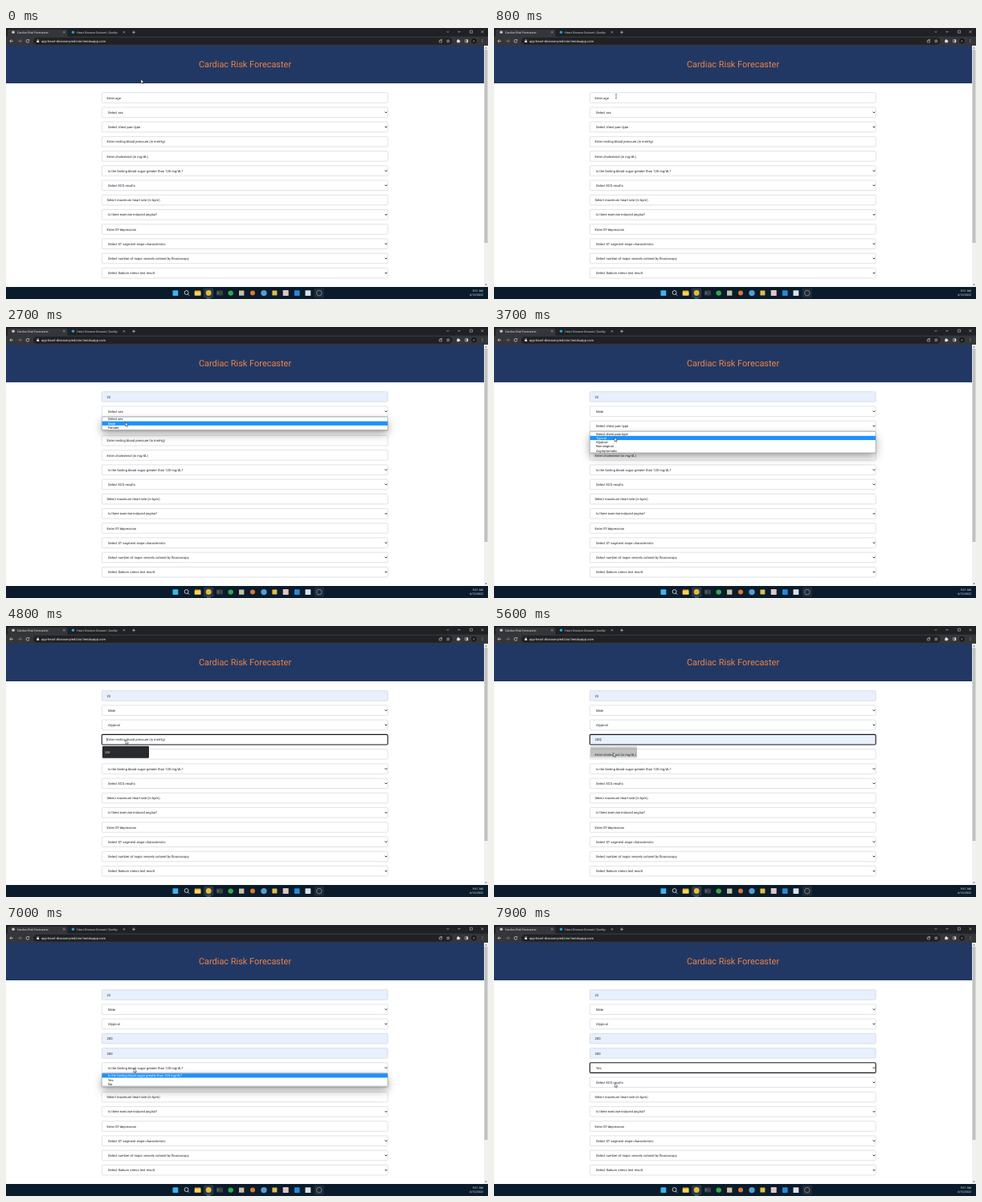
Write an HTML page with a canvas that moves like this. It is 600x338 px and loops after 8000 ms.

```html
<!DOCTYPE html>
<html lang="en">
<head>
<meta charset="utf-8">
<title>Cardiac Risk Forecaster</title>
<style>
html, body { margin: 0; width: 100%; height: 100%; overflow: hidden; background: #fff; }
canvas { display: block; width: 600px; height: 338px; }
</style>
</head>
<body>
<canvas id="stage"></canvas>
<script>
const W = 600, H = 338, LOOP = 8000, STEP = 100;
const FONT = 'Roboto, Arial, sans-serif';
const LEFT = 119, WIDTH = 356.5, ROW = 5.25;
const canvas = document.getElementById('stage');
const ctx = canvas.getContext('2d');
const dpr = window.devicePixelRatio || 1;
canvas.width = W * dpr;
canvas.height = H * dpr;
ctx.scale(dpr, dpr);

// focus: [on, off], menu: [open, close], set: time the value appears
const fields = [
  { label: 'Enter age', value: '23', set: 1400, focus: [1000, 2300], popup: [1100, 1520] },
  { label: 'Select sex', value: 'Male', set: 2900, focus: [2900, 3400], menu: [2400, 2900],
    options: ['Select sex', 'Male', 'Female'] },
  { label: 'Select chest pain type', value: 'Atypical', set: 4100, focus: [4100, 4700], menu: [3500, 4100],
    options: ['Select chest pain type', 'Typical', 'Atypical', 'Non-anginal', 'Asymptomatic'] },
  { label: 'Enter resting blood pressure (in mmHg)', value: '200', set: 5200, focus: [4700, 6000], popup: [4800, 5467] },
  { label: 'Enter cholesterol (in mg/dL)', value: '200', set: 6300, focus: [6000, 6950], popup: [6100, 6420] },
  { label: 'Is the fasting blood sugar greater than 120 mg/dL?', value: 'Yes', set: 7500, focus: [7500, LOOP], menu: [7000, 7500],
    options: ['Is the fasting blood sugar greater than 120 mg/dL?', 'Yes', 'No'] },
  { label: 'Select ECG results', select: true },
  { label: 'Select maximum heart rate (in bpm)' },
  { label: 'Is there exercise-induced angina?', select: true },
  { label: 'Enter ST-depression' },
  { label: 'Select ST segment slope characteristic', select: true },
  { label: 'Select number of major vessels colored by flouroscopy', select: true },
  { label: 'Select thalium stress test result', select: true }
];
fields.forEach((f, i) => {
  f.y = 87 + 18.22 * i;
  f.select = f.select || !!f.options;
});

// [time, x, y] of the pointer tip
const path = [
  [0, 168, 64], [100, 168, 64], [800, 152, 85], [1000, 152, 85],
  [1400, 150.5, 100.8], [1700, 150.5, 100.8], [2100, 149.5, 103.5], [2400, 149.5, 103.5],
  [2700, 148.5, 118.8], [2900, 148.5, 118.8], [3300, 150, 122.5], [3500, 150, 122.5],
  [3700, 150, 137.8], [3800, 150, 137.8], [4000, 149, 142.5], [4700, 149, 140.5],
  [5200, 148.5, 158], [6000, 148.5, 158], [6300, 150, 174.5], [6400, 150, 174.5],
  [6800, 159, 179], [7100, 159, 179], [7400, 150.3, 192], [7500, 150.3, 192],
  [7900, 150.3, 197.3]
];

function pointerAt(t) {
  const i = path.findIndex(p => p[0] > t);
  if (i < 0) return path[path.length - 1].slice(1);
  const [a, b] = [path[i - 1], path[i]];
  const u = (t - a[0]) / (b[0] - a[0]), e = u * u * (3 - 2 * u);
  return [a[1] + (b[1] - a[1]) * e, a[2] + (b[2] - a[2]) * e];
}

const within = (t, span) => !!span && t >= span[0] && t < span[1];

function text(s, x, y, size, color, align = 'left', weight = 400) {
  ctx.font = `${weight} ${size}px ${FONT}`;
  ctx.textRendering = 'geometricPrecision';
  ctx.textAlign = align;
  ctx.fillStyle = color;
  ctx.fillText(s, x, y + size * 0.355);
}

function rect(x, y, w, h, color) {
  ctx.fillStyle = color;
  ctx.fillRect(x, y, w, h);
}

function box(x, y, w, h, r, fill, stroke, lw = 0.6) {
  ctx.beginPath();
  ctx.roundRect(x, y, w, h, r);
  if (fill) { ctx.fillStyle = fill; ctx.fill(); }
  if (stroke) { ctx.strokeStyle = stroke; ctx.lineWidth = lw; ctx.stroke(); }
}

function disc(x, y, r, fill, stroke, lw = 0.7) {
  box(x - r, y - r, 2 * r, 2 * r, r, fill, stroke, lw);
}

function line(points, color, lw = 0.6) {
  ctx.beginPath();
  points.forEach(([x, y], i) => i ? ctx.lineTo(x, y) : ctx.moveTo(x, y));
  ctx.strokeStyle = color;
  ctx.lineWidth = lw;
  ctx.stroke();
}

function shape(points, color) {
  ctx.beginPath();
  points.forEach(([x, y]) => ctx.lineTo(x, y));
  ctx.closePath();
  ctx.fillStyle = color;
  ctx.fill();
}

function cross(x, y, r, color) {
  line([[x - r, y - r], [x + r, y + r]], color, 0.5);
  line([[x + r, y - r], [x - r, y + r]], color, 0.5);
}

function drawBrowser() {
  const ink = '#dfe1e5';
  rect(0, 0, W, 11, '#202124');
  box(2, 1.8, 74.5, 12, 2.2, '#35363a');
  rect(0, 10.6, W, 11.6, '#35363a');
  disc(9, 5.3, 1.8, '#c4c7cb');
  text('Cardiac Risk Forecaster', 13.8, 5.4, 3.7, ink);
  cross(72.3, 5.3, 1.1, ink);
  disc(83.5, 5.3, 1.7, '#20a5dc');
  text('Heart Disease Dataset | Quolby', 88, 5.4, 3.7, '#c6c9cd');
  cross(147, 5.3, 1.1, ink);
  line([[157, 5.3], [161, 5.3]], ink);
  line([[159, 3.3], [159, 7.3]], ink);
  line([[548.7, 4.2], [550, 5.5], [551.3, 4.2]], ink);
  line([[562.5, 4.8], [565.5, 4.8]], ink);
  box(577.5, 3.2, 3, 3, 0, null, ink, 0.5);
  cross(593, 4.8, 1.5, ink);

  line([[9, 16.3], [4.8, 16.3]], ink, 0.7);
  line([[6.7, 14.4], [4.8, 16.3], [6.7, 18.2]], ink, 0.7);
  line([[15, 16.3], [19.2, 16.3]], '#85878b', 0.7);
  line([[17.3, 14.4], [19.2, 16.3], [17.3, 18.2]], '#85878b', 0.7);
  ctx.beginPath();
  ctx.arc(27, 16.3, 1.9, 0.3, 5.5);
  ctx.strokeStyle = ink;
  ctx.stroke();
  shape([[27.5, 15.8], [29.2, 15.8], [29.2, 14]], ink);

  box(34, 12, 521.5, 8.8, 4.4, '#202124');
  box(38.3, 15.8, 2.8, 2.2, 0.3, ink);
  box(38.9, 14.3, 1.6, 2.5, 0.8, null, ink, 0.5);
  text('app-heart-disease-predictor.herokuapp.com', 44, 16.4, 4.15, '#eceef0');
  box(539.3, 15.2, 3.2, 2.8, 0.2, null, ink, 0.5);
  line([[540.8, 16.4], [541.2, 14.4], [543.2, 14.4]], ink, 0.5);
  const star = [];
  for (let i = 0; i < 11; i++) {
    const a = -Math.PI / 2 + i * Math.PI / 5, r = i % 2 ? 0.9 : 2;
    star.push([550.3 + r * Math.cos(a), 16.4 + r * Math.sin(a)]);
  }
  line(star, ink, 0.5);
  box(561.3, 15, 3.4, 3.2, 0.5, ink);
  disc(562.8, 14.8, 0.8, ink);
  disc(564.8, 16.6, 0.8, ink);
  box(571.5, 14.6, 3.4, 3.4, 0.3, null, ink, 0.5);
  rect(573.3, 14.6, 1.6, 3.4, ink);
  disc(582.5, 16.3, 3.2, '#17181a');
  text('F', 582.5, 16.4, 3.8, ink, 'center');
  for (let i = -1; i < 2; i++) disc(593, 16.3 + i * 1.6, 0.45, ink);
}

function drawPage() {
  rect(0, 22, W, 301, '#fff');
  rect(0, 22, 595, 47, '#223864');
  text('Cardiac Risk Forecaster', 297.5, 45.3, 10.95, '#ee8444', 'center');
  rect(595, 22, 5, 301, '#f1f1f1');
  rect(595.5, 27, 4, 241, '#c1c1c1');
  shape([[596.2, 25.4], [598.8, 25.4], [597.5, 23.9]], '#555');
  shape([[596.2, 319.6], [598.8, 319.6], [597.5, 321.1]], '#555');
}

function drawField(f, t) {
  const filled = f.value && t >= f.set, focused = within(t, f.focus);
  const x = f.select ? 127 : 125.5, label = filled ? f.value : f.label;
  box(LEFT + 0.3, f.y - 6.3, WIDTH - 0.6, 12.6, 1.4,
    filled && !f.select ? '#e8f0fe' : '#fff', focused ? '#15171c' : '#c9ced4', focused ? 1.1 : 0.6);
  text(label, x, f.y + 0.2, 4.15, '#24272b');
  if (f.select) line([[471.8, f.y - 0.7], [473.1, f.y + 0.7], [474.4, f.y - 0.7]], '#111', 0.9);
  else if (focused) {
    const end = filled ? x + ctx.measureText(label).width + 0.3 : x;
    rect(end, f.y - 2.2, 0.4, 4.4, '#222');
  }
}

function drawMenu(f, t, py) {
  if (!within(t, f.menu)) return;
  const top = f.y + 6.9, h = f.options.length * ROW + 0.4;
  const hover = Math.max(0, Math.min(f.options.length - 1, Math.floor((py + 0.3 - top) / ROW)));
  ctx.save();
  ctx.shadowColor = 'rgba(0,0,0,.36)';
  ctx.shadowBlur = 11 * dpr;
  ctx.shadowOffsetY = 5 * dpr;
  rect(LEFT + 0.3, top, WIDTH - 0.6, h, '#fff');
  ctx.restore();
  box(LEFT + 0.3, top, WIDTH - 0.6, h, 0, '#fff', '#75797e', 0.5);
  f.options.forEach((s, i) => {
    const y = top + 0.2 + i * ROW;
    if (i === hover) rect(LEFT + 0.5, y, WIDTH - 1, ROW, '#1e90ff');
    text(s, 127, y + ROW / 2 + 0.1, 4.08, i === hover ? '#fff' : '#16181a');
  });
}

function drawPopup(f, t) {
  if (!f.popup || t < f.popup[0]) return;
  const alpha = 1 - Math.max(0, t - f.popup[1]) / 160;
  if (alpha <= 0) return;
  ctx.save();
  ctx.globalAlpha = alpha;
  const top = f.y + 8;
  box(120, top, 58, 15, 0.8, '#292a2d');
  if (t >= f.set) rect(120, top + 1.8, 58, 11.4, '#3f4042');
  text(f.value, 123, top + 7.5, 3.9, '#e8eaed');
  ctx.restore();
}

function drawTaskbar() {
  const y = 330.6;
  rect(0, 323, W, 15, '#0a1b2b');
  box(207.5, y - 3.4, 6.8, 6.8, 0.4, '#3cb4f0');
  disc(224.6, y - 0.6, 2.5, null, '#e4e8ec', 0.8);
  line([[226.3, y + 1.3], [228, y + 3]], '#e4e8ec', 0.9);
  box(234.8, y - 3.2, 7.6, 6.2, 0.6, '#e6ad2c');
  rect(234.8, y - 1.4, 7.6, 4.4, '#fbd35e');
  box(246.2, 324.6, 12, 12, 1.3, '#283848');
  disc(252.2, y - 0.2, 3.4, '#e8ba35');
  rect(249.7, 336.6, 5, 0.7, '#72bdea');
  box(262, y - 3, 8, 6, 0.6, '#3a4148');
  line([[263.2, y - 1.2], [264.4, y - 0.2], [263.2, y + 0.8]], '#d8dcdf', 0.5);
  disc(279.7, y, 3.2, '#35a64a');
  box(290, y - 3.2, 6.4, 6.4, 0.4, '#c8c0a0');
  disc(307, y, 3, '#dc7734');
  disc(321, y, 3.7, '#589bd2');
  box(331.4, y - 3, 6, 6, 0.5, '#dfbd4b');
  box(344.7, y - 3.5, 7, 7, 0.5, '#ddc6ca');
  box(359, y - 3.3, 6.6, 6.6, 0.5, '#2789d6');
  box(372.5, y - 3.3, 6.8, 6.6, 0.5, '#d8e2ec');
  box(383.8, 324.6, 12, 12, 1.3, '#1c2c3b');
  disc(389.8, y, 3.3, '#25282c', '#b4b8bb', 0.6);
  text('9:31 AM', 594, 328.2, 3.6, '#e3e7ea', 'right');
  text('4/10/2022', 594, 333.2, 3.6, '#e3e7ea', 'right');
}

function drawPointer(x, y, t) {
  const covered = fields.some(f => within(t, f.menu) || (f.popup && within(t, [f.popup[0], f.popup[1] + 160])));
  const overInput = !covered && fields.some(f => !f.select && Math.abs(y + 0.2 - f.y) < 6.3);
  if (overInput) {
    line([[x, y - 2.4], [x, y + 2.8]], '#222', 0.5);
    line([[x - 1, y - 2.4], [x + 1, y - 2.4]], '#222', 0.4);
    line([[x - 1, y + 2.8], [x + 1, y + 2.8]], '#222', 0.4);
    return;
  }
  const arrow = [[0, 0], [0, 5], [1.15, 3.95], [2, 5.8], [2.8, 5.45], [2, 3.65], [3.6, 3.6]]
    .map(([dx, dy]) => [x + dx, y + dy]);
  shape(arrow, '#fff');
  line([...arrow, arrow[0]], '#111', 0.45);
}

function draw(t) {
  const [x, y] = pointerAt(t);
  drawBrowser();
  drawPage();
  fields.forEach(f => drawField(f, t));
  fields.forEach(f => { drawMenu(f, t, y); drawPopup(f, t); });
  drawTaskbar();
  drawPointer(x, y, t);
}

function tick() {
  const t = performance.now() % LOOP;
  draw(Math.floor(t / STEP) * STEP);
  requestAnimationFrame(tick);
}
tick();
</script>
</body>
</html>
```
